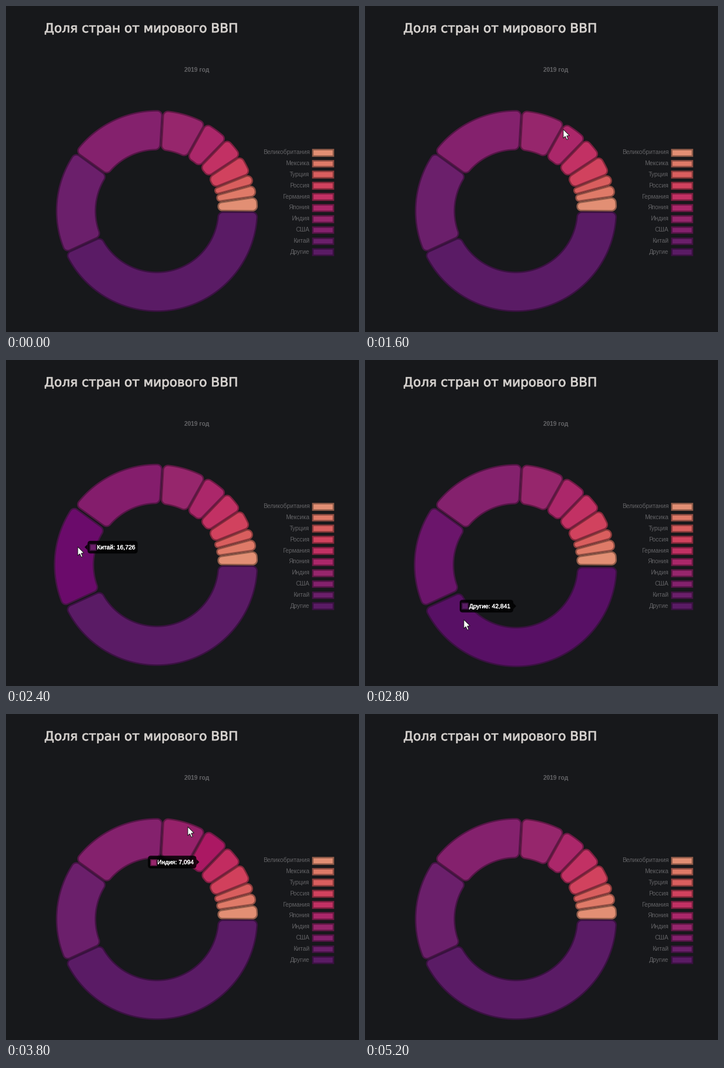
Recreate the animation shown at these times as a matplotlib script. Size 600 by 555 pixels, loop 5300 ms.

```python
import colorsys

import matplotlib.pyplot as plt
import numpy as np
from matplotlib.animation import FuncAnimation
from matplotlib.colors import to_rgb
from matplotlib.patches import FancyBboxPatch, Polygon, Rectangle
from matplotlib.patheffects import withStroke
from matplotlib.textpath import TextPath

W, H, DPI = 600, 555, 60
FRAMES, STEP = 53, 100
PT = 72 / DPI  # points per pixel
FONT, SIZE = "Liberation Sans", 10.3
BG, GREY = "#17181b", "#636366"

CENTER = 256.5 + 349j
R_OUT, R_IN, GAP, CORNER = 170.5, 104.5, 1.3, 8
HOVER_SHIFT = 4

SLICES = [
    ("Великобритания", 2374, "#e28f74"),
    ("Мексика", 1932, "#df7a68"),
    ("Турция", 1794, "#d95e5e"),
    ("Россия", 3229, "#d1425e"),
    ("Германия", 3450, "#c23164"),
    ("Япония", 4140, "#ab276a"),
    ("Индия", 7094, "#96266c"),
    ("США", 15902, "#84216d"),
    ("Китай", 16726, "#6b1f6b"),
    ("Другие", 42841, "#5a1b65"),
]
NAMES, VALUES, COLORS = zip(*SLICES)
LABELS = [f"{n}: {v:,}" for n, v in zip(NAMES, VALUES)]
BOUNDS = np.radians(-0.3 + 360 * np.cumsum([0, *VALUES]) / sum(VALUES))
MIDS = (BOUNDS[:-1] + BOUNDS[1:]) / 2

# time in ms and index of the slice under the pointer
HITS = [(1600, 5), (1680, 6), (2045, 7), (2250, 8), (2725, 9), (3480, 0),
        (3510, 1), (3535, 2), (3560, 3), (3620, 4), (3690, 5), (3780, 6)]
LEAVE = 3930

# pointer path: time, x, y
PATH = np.array([
    (1400, 440, -20), (1500, 372, 130), (1600, 337, 210), (1700, 330, 213),
    (1900, 305, 217), (2045, 264, 224), (2100, 209, 236), (2250, 150, 271),
    (2400, 122, 318), (2600, 115, 380), (2725, 125, 408), (2800, 168, 442),
    (2950, 226, 478), (3100, 300, 481), (3250, 360, 445), (3400, 396, 385),
    (3480, 403, 350), (3560, 387, 297), (3620, 374, 271), (3690, 352, 250),
    (3780, 322, 214), (3800, 309, 192), (3930, 305, 183), (4050, 318, 120),
    (4200, 350, -25),
]).T
ARROW = np.array([(0, 0), (0, 15), (3.4, 11.9), (5.9, 17.6), (8.3, 16.6),
                  (5.9, 11), (10.6, 10.7)])


def polar(r, a):
    return r * np.exp(-1j * a)


def corner(p, c, q):
    """Circle-like arc from p to q with control point c."""
    s = np.linspace(0, 1, 10)
    b0, b1, b2 = (1 - s) ** 2, 1.414 * s * (1 - s), s ** 2
    return (b0 * p + b1 * c + b2 * q) / (b0 + b1 + b2)


def sector(a0, a1):
    """Outline of a ring slice with rounded corners, around the origin."""
    def side(r):
        lo, hi = a0 + GAP / r, a1 - GAP / r
        return lo, hi, min(CORNER, 0.48 * (hi - lo) * r)

    lo, hi, c = side(R_OUT)
    d = c / R_OUT
    outer = [
        corner(polar(R_OUT - c, lo), polar(R_OUT, lo), polar(R_OUT, lo + d)),
        polar(R_OUT, np.linspace(lo + d, hi - d, 80)),
        corner(polar(R_OUT, hi - d), polar(R_OUT, hi), polar(R_OUT - c, hi)),
    ]
    lo, hi, c = side(R_IN)
    d = c / R_IN
    inner = [
        corner(polar(R_IN + c, hi), polar(R_IN, hi), polar(R_IN, hi - d)),
        polar(R_IN, np.linspace(hi - d, lo + d, 80)),
        corner(polar(R_IN, lo + d), polar(R_IN, lo), polar(R_IN + c, lo)),
    ]
    return np.concatenate(outer + inner)


def xy(z):
    return np.column_stack([z.real, z.imag])


def border(color):
    return tuple(0.64 * v for v in to_rgb(color))


def vivid(color):
    h, s, v = colorsys.rgb_to_hsv(*to_rgb(color))
    return np.array(colorsys.hsv_to_rgb(h, s + 0.75 * (1 - s), v))


def ease(p):
    return 1 - (1 - min(max(p, 0), 1)) ** 4


def chase(t, keys, value, span=400):
    """Ease towards each goal in turn, starting again wherever it has got to."""
    for k, (start, goal) in enumerate(keys):
        if t < start:
            break
        stop = min(t, keys[k + 1][0]) if k + 1 < len(keys) else t
        value = value + (goal - value) * ease((stop - start) / span)
    return value


def level_keys(i):
    keys = []
    ends = [start for start, _ in HITS[1:]] + [LEAVE]
    for (start, hit), end in zip(HITS, ends):
        if hit == i:
            keys += [(start, 1), (end, 0)]
    return keys


def text_width(s):
    return TextPath((0, 0), s, size=SIZE, prop={"family": FONT}).get_extents().width


ANCHORS = CENTER + polar((R_OUT + R_IN) / 2, MIDS)
WIDTHS = [text_width(s) + 21.5 for s in LABELS]
CARET_LEFT = [z.real <= CENTER.real for z in ANCHORS]


def tip_goal(i):
    z = ANCHORS[i]
    x = z.real + 7 if CARET_LEFT[i] else z.real - 7 - WIDTHS[i]
    return np.array([x, z.imag])


LEVEL_KEYS = [level_keys(i) for i in range(len(SLICES))]
TIP_KEYS = [(start, tip_goal(i)) for start, i in HITS]

fig = plt.figure(figsize=(W / DPI, H / DPI), dpi=DPI, facecolor=BG)
ax = fig.add_axes([0, 0, 1, 1])
ax.set_xlim(0, W)
ax.set_ylim(H, 0)
ax.axis("off")


def label(x, y, s, size=SIZE, color=GREY, font=FONT, **kw):
    return ax.text(x, y, s, fontsize=size * PT, color=color, family=font,
                   va="baseline", **kw)


title_color = "#d2cecb"
label(65, 45, "Доля стран от мирового ВВП", 21.6, title_color, "DejaVu Sans",
      path_effects=[withStroke(linewidth=0.8 * PT, foreground=title_color)])
label(324, 112, "2019 год", weight="bold", ha="center")

for i, (name, color) in enumerate(zip(NAMES, COLORS)):
    y = 249 + 18.85 * i
    label(516, y + 3.2, name, ha="right")
    ax.add_patch(Rectangle((521, y - 5.3), 35, 10.8, fc=color,
                           ec=border(color), lw=2.5 * PT))

outlines = [CENTER + sector(a, b) for a, b in zip(BOUNDS[:-1], BOUNDS[1:])]
arcs = []
for z, color in zip(outlines, COLORS):
    arc = Polygon(xy(z), fc=color, ec=border(color), lw=2.5 * PT,
                  joinstyle="round")
    arcs.append(ax.add_patch(arc))

box = ax.add_patch(FancyBboxPatch((0, 0), 80, 21.5, fc="black", ec="none", zorder=4,
                                  boxstyle="round,pad=0,rounding_size=5"))
caret = ax.add_patch(Polygon(np.zeros((3, 2)), fc="black", ec="none", zorder=4))
swatch = ax.add_patch(Rectangle((0, 0), 10, 10, lw=1.7 * PT, zorder=5))
tip_text = label(0, 0, "", color="white", zorder=5,
                 path_effects=[withStroke(linewidth=0.35 * PT, foreground="white")])
pointer = ax.add_patch(Polygon(ARROW, fc="white", ec="#101010", lw=0.9 * PT,
                               zorder=6))
tip_parts = [box, caret, swatch, tip_text]


def draw_tip(t):
    alpha = chase(t, [(HITS[0][0], 1), (LEAVE, 0)], 0, 250)
    for part in tip_parts:
        part.set_visible(alpha > 0.01)
    if alpha <= 0.01:
        return
    i = [hit for start, hit in HITS if start <= t][-1]
    x, y = chase(t, TIP_KEYS, TIP_KEYS[0][1])
    box.set_bounds(x, y - 10.75, WIDTHS[i], 21.5)
    base, way = (x, -5) if CARET_LEFT[i] else (x + WIDTHS[i], 5)
    caret.set_xy([(base, y - 5), (base + way, y), (base, y + 5)])
    swatch.set_xy((x + 4.5, y - 4.5))
    swatch.set_facecolor(COLORS[i])
    swatch.set_edgecolor(border(COLORS[i]))
    tip_text.set_position((x + 16, y + 3.6))
    tip_text.set_text(LABELS[i])
    box.set_alpha(0.85 * alpha)
    caret.set_alpha(0.85 * alpha)
    swatch.set_alpha(alpha)
    tip_text.set_alpha(alpha)


def update(n):
    t = n * STEP
    for arc, z, mid, color, keys in zip(arcs, outlines, MIDS, COLORS, LEVEL_KEYS):
        level = chase(t, keys, 0)
        arc.set_xy(xy(z + polar(HOVER_SHIFT * level, mid)))
        plain = np.array(to_rgb(color))
        arc.set_facecolor(plain + (vivid(color) - plain) * level)
    draw_tip(t)
    times, xs, ys = PATH
    pointer.set_visible(times[0] <= t <= times[-1])
    pointer.set_xy(ARROW + (np.interp(t, times, xs), np.interp(t, times, ys)))
    return [*arcs, *tip_parts, pointer]


anim = FuncAnimation(fig, update, frames=FRAMES, interval=STEP, repeat=True,
                     repeat_delay=0, blit=False, init_func=lambda: update(0))
plt.show()
```
